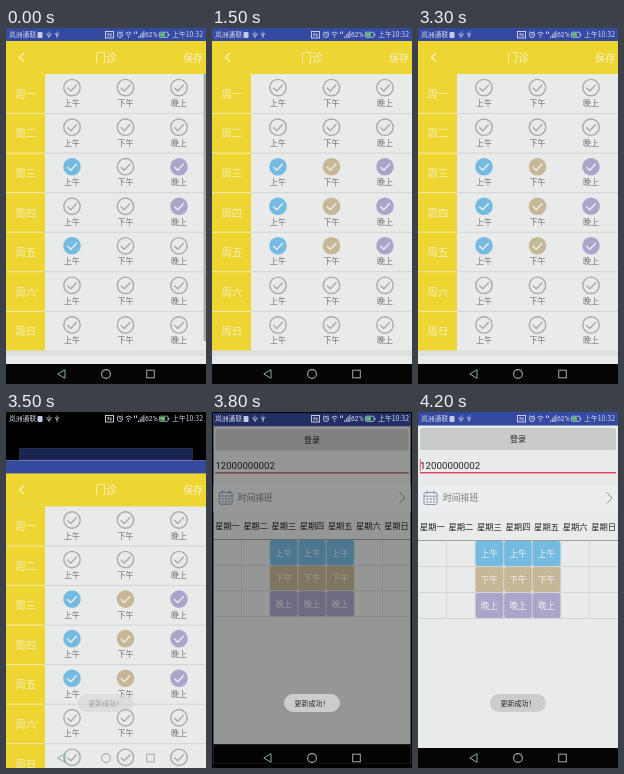
Write an HTML page that moves like this. It is 200 px wide and 356 px high and loops after 4500 ms.

```html
<!DOCTYPE html>
<html lang="zh-CN">
<head>
<meta charset="utf-8">
<title>门诊排班</title>
<style>
  html, body { margin: 0; width: 100%; height: 100%; overflow: hidden; background: #000; }
  svg { display: block; width: 100vw; height: 100vh; }
  text { font-family: "Noto Sans CJK SC", "Noto Sans CJK", "Noto Sans", sans-serif; }
  .latin { font-family: Roboto, sans-serif; }
</style>
</head>
<body>
<svg id="stage" viewBox="0 0 200 356" preserveAspectRatio="none">
  <rect width="200" height="356"/>
  <g id="login"></g>
  <rect id="dim" width="200" height="356"/>
  <g id="clinic"></g>
  <g id="toast"></g>
  <g id="system"></g>
</svg>
<script>
const LOOP = 4500, TICK = 100;
const COLORS = ['#75bbe1', '#c6b896', '#aaa6ca'];
const SHIFTS = ['上午', '下午', '晚上'];
const DAYS = [...'一二三四五六日'];
const YELLOW = '#edd532', BLUE = '#3549a0', PAPER = '#e9eaea';
const $ = id => document.getElementById(id);

function add(parent, tag, attrs, content) {
  const el = document.createElementNS('http://www.w3.org/2000/svg', tag);
  for (const key in attrs) el.setAttribute(key, attrs[key]);
  if (content) el.textContent = content;
  return parent.appendChild(el);
}
const box = (g, x, y, width, height, fill, rx = 0) =>
  add(g, 'rect', { x, y, width, height, fill, rx });
const stroke = (g, d, color, width = 1) =>
  add(g, 'path', { d, stroke: color, 'stroke-width': width, fill: 'none' });
const label = (g, x, y, content, size, fill, anchor = 'middle', extra = {}) =>
  add(g, 'text', { x, y: y + size * 0.37, 'font-size': size, fill, 'text-anchor': anchor, ...extra }, content);

function windowFrame(g) {
  box(g, 0, 0, 200, 356, PAPER);
  box(g, 0, 0, 200, 13.5, BLUE);
  box(g, 0, 336, 200, 20, '#050505');
}

// Clinic page: ticks per weekday and shift
const ROW = 39.55, TOP = 46, COLUMNS = [66, 119.5, 173];
const clinic = $('clinic');
windowFrame(clinic);
box(clinic, 0, 13, 200, 33, YELLOW);
box(clinic, 0, TOP, 39, ROW * 7, YELLOW);
stroke(clinic, 'M18 25 L13.5 29.3 L18 33.6', '#faf5cf', 1.2);
label(clinic, 100, 29.5, '门诊', 11, '#f8f2cc');
label(clinic, 187, 30, '保存', 10, '#f8f2cc');
box(clinic, 0, 322.5, 200, 5.5, '#dedfdf');

const marks = DAYS.map((day, row) => {
  const y = TOP + row * ROW;
  label(clinic, 19.7, y + 20, '周' + day, 10.5, '#f6efbd');
  if (row) {
    box(clinic, 0, y - 0.5, 39, 1, '#f5eca6');
    box(clinic, 39, y - 0.5, 161, 1, '#d3d4d4');
  }
  return COLUMNS.map((x, col) => {
    const cy = y + 13.6;
    const ring = add(clinic, 'circle', { cx: x, cy, 'stroke-width': 1.4 });
    const tick = stroke(clinic, `M${x - 4.7} ${cy + 0.2} l3.5 3.3 l6 -6.4`, '#aaa', 1.4);
    label(clinic, x, cy + 15.6, SHIFTS[col], 8, '#707070');
    return { set(on) {
      ring.setAttribute('r', on ? 8.8 : 8.2);
      ring.setAttribute('fill', on ? COLORS[col] : 'none');
      ring.setAttribute('stroke', on ? 'none' : '#aaa');
      tick.setAttribute('stroke', on ? '#eceded' : '#aaa');
    } };
  });
});
const scrollbar = box(clinic, 197.6, TOP, 2.4, 267, '#a6a6a6');

// Login page with the weekly summary
const CELL = 200 / 7, GRID = 128.5, CELL_H = 26;
const login = $('login');
windowFrame(login);
box(login, 2, 16, 196, 22, '#c9caca', 1.5);
label(login, 100, 27, '登录', 8, '#222');
label(login, 2, 53, '12000000002', 9.75, '#222', 'start', { class: 'latin' });
const underline = box(login, 2, 60, 196, 1.4, '#e53b62');
const cursor = box(login, 1.8, 47, 0.9, 12, '#e53b62');
box(login, 0, 73, 200, 27, '#ecedee');
const icon = '#8798b2';
add(login, 'rect', { x: 6, y: 80.5, width: 13, height: 12, rx: 1.5, fill: 'none', stroke: icon });
stroke(login, 'M6 84.2 H19 M9 78.5 V82 M16 78.5 V82', icon);
stroke(login, 'M8.5 87 H17 M8.5 90 H17', icon, 1.3).setAttribute('stroke-dasharray', '1.8 1.5');
label(login, 25, 86, '时间排班', 8.8, '#777', 'start');
stroke(login, 'M189 80.5 L194 86 L189 91.5', '#8d8d8d', 1);
DAYS.forEach((day, i) => label(login, CELL * (i + 0.5), 115, '星期' + day, 8.3, '#222'));
box(login, 0, 128, 200, 0.8, '#8c8c8c');
for (let i = 1; i < 7; i++) box(login, CELL * i - 0.3, GRID, 0.6, CELL_H * 3, '#cfcfcf');
SHIFTS.forEach((shift, row) => {
  const y = GRID + row * CELL_H;
  box(login, 0, y + CELL_H - 0.3, 200, 0.6, '#c6c6c6');
  for (let col = 2; col < 5; col++) {
    box(login, CELL * col + 0.4, y + 0.4, CELL - 0.8, CELL_H - 0.8, COLORS[row], 2);
    label(login, CELL * (col + 0.5), y + 13, shift, 8.6, '#eceff0');
  }
});

const toast = $('toast');
box(toast, 72, 282, 56, 18, '#cbcccc', 9);
label(toast, 100, 291.3, '更新成功！', 7, '#222');

// Status icons and navigation keys
const system = $('system'), pale = '#d5daeb';
label(system, 3, 6.8, '岚洲通联', 6.8, pale, 'start');
box(system, 31.5, 4, 5, 6, '#c3cbe5', 1);
stroke(system, 'M43 3.5 V10 M41 5 V7 L43 8.5 L45 7 V5 M51 3.5 V10 M49 5 L51 8 L53 5', pale, 0.7);
add(system, 'rect', { x: 99.5, y: 3.5, width: 8, height: 6.5, fill: 'none', stroke: pale, 'stroke-width': 0.9 });
stroke(system, 'M102 8.5 V5 L105 8.5 V5', pale, 0.8);
add(system, 'circle', { cx: 114, cy: 7, r: 2.6, fill: 'none', stroke: pale, 'stroke-width': 0.8 });
stroke(system, 'M114 5.3 V7.2 H115.4 M111 4.7 L112.5 3.3 M117 4.7 L115.5 3.3', pale, 0.7);
stroke(system, 'M119.5 5.5 Q122.5 2.5 125.5 5.5 M120.8 7.3 Q122.5 5.6 124.2 7.3 M122.5 8.3 V9.8', pale, 0.9);
stroke(system, 'M128.5 3.5 V6 M130.5 3.5 V6 M132.5 8.5 V10 M134.3 6.5 V10 M136.1 4.5 V10 M137.9 3 V10', pale, 0.9);
label(system, 139, 6.8, '62%', 6.8, pale, 'start', { class: 'latin' });
add(system, 'rect', { x: 153.4, y: 4.2, width: 8.6, height: 5.2, rx: 0.8, fill: 'none', stroke: pale, 'stroke-width': 0.7 });
box(system, 154.2, 5, 4.8, 3.6, '#59c36b');
box(system, 162.4, 5.8, 0.9, 2, pale);
label(system, 166, 6.8, '上午10:32', 6.9, pale, 'start');
stroke(system, 'M59 341.7 L51.8 346 L59 350.3 Z', '#7fb0a8', 1);
add(system, 'circle', { cx: 100, cy: 346, r: 4.4, fill: 'none', stroke: '#a9a9a9', 'stroke-width': 1.1 });
add(system, 'rect', { x: 140.7, y: 342.2, width: 7.6, height: 7.6, fill: 'none', stroke: '#a9a9a9', 'stroke-width': 1 });

// [row, column, time selected]
const TAPS = [
  [2, 0, 0], [4, 0, 0], [2, 2, 0], [3, 2, 0],
  [4, 2, 200], [4, 1, 400], [3, 1, 900], [2, 1, 1300], [3, 0, 1500]
];
const CLOSE = 3400, CLOSE_TIME = 500;
const clamp = v => Math.min(1, Math.max(0, v));
const ease = v => (1 - Math.cos(Math.PI * clamp(v))) / 2;

function render(time) {
  const t = Math.floor(time / TICK) * TICK;
  marks.forEach(row => row.forEach(mark => mark.set(false)));
  for (const [row, col, at] of TAPS) marks[row][col].set(t >= at);
  scrollbar.setAttribute('opacity', clamp(1 - t / 500));

  const p = ease((t - CLOSE) / CLOSE_TIME);
  const scale = 0.85 + 0.15 * p;
  const drop = 42.5 * (1 - p) ** 1.6;
  login.setAttribute('transform', `translate(${100 * (1 - scale)} ${drop}) scale(${scale})`);
  clinic.setAttribute('transform', `translate(0 ${507 * p})`);
  $('dim').setAttribute('opacity', t < 3800 ? 0.5 : t < 3900 ? 0.36 : t < 4000 ? 0.17 : 0);
  toast.setAttribute('opacity', clamp((t - CLOSE) / 270));
  underline.setAttribute('fill', t >= 3800 && t < 4000 ? '#b0676f' : '#e53b62');
  cursor.setAttribute('opacity', t < 3800 || t >= 4200 ? 1 : 0);
}

const start = performance.now();
function loop() {
  render((performance.now() - start) % LOOP);
  requestAnimationFrame(loop);
}
loop();
</script>
</body>
</html>
```
